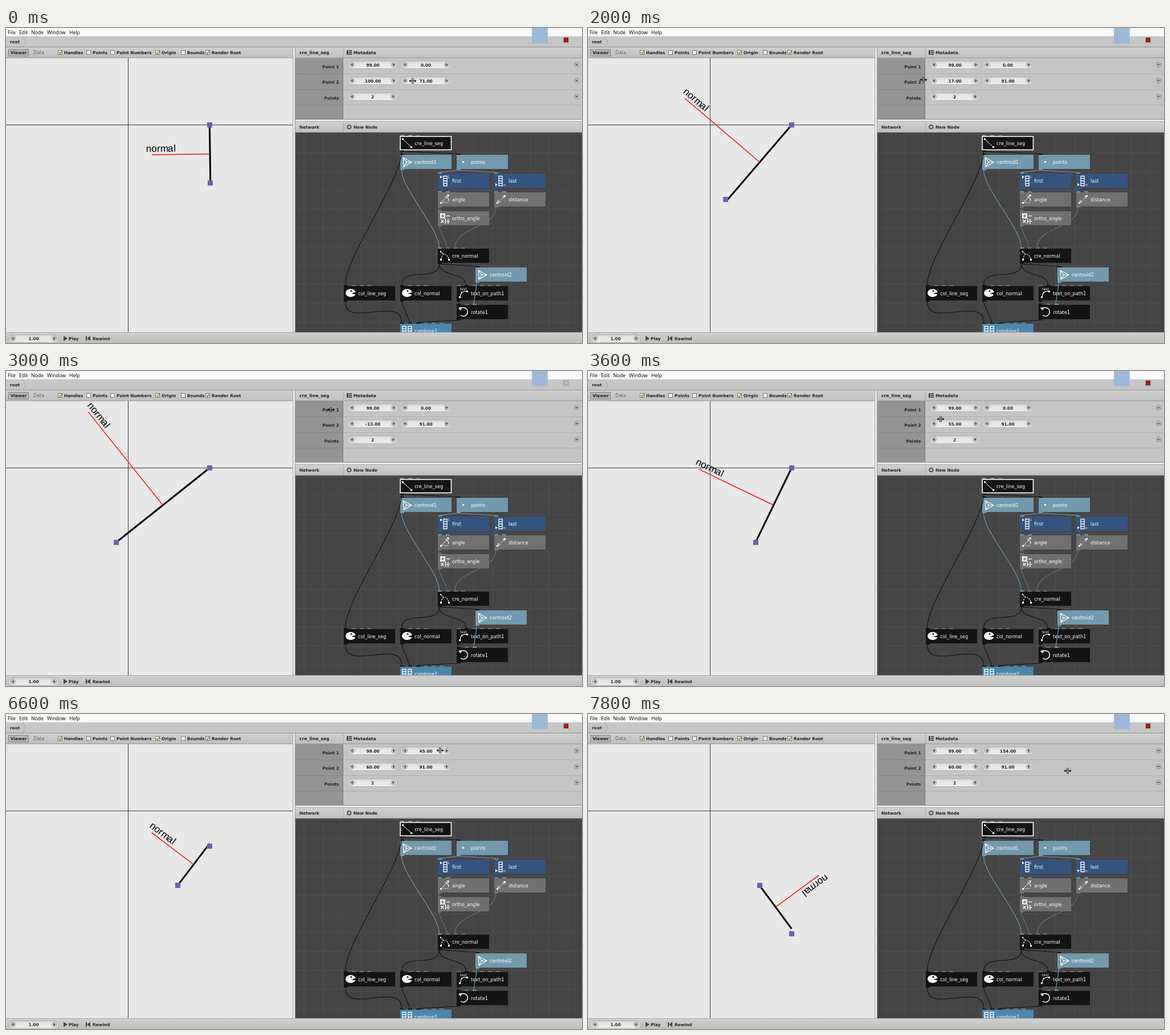
Write an HTML page that moves like this. It is 1011 px wide and 554 px high and loops after 8 s.

```html
<!DOCTYPE html>
<html lang="en">
<head>
<meta charset="utf-8">
<title>Line normal editor</title>
<style>
html, body { margin: 0; width: 100%; height: 100%; overflow: hidden; background: #c6c6c6; }
svg { display: block; width: 1011px; height: 554px; }
rect.c { shape-rendering: crispEdges; }
text { font-family: "DejaVu Sans", sans-serif; white-space: pre; }
.b { font-weight: bold; font-size: 7.35px; fill: #222; }
.menu { font-family: "Open Sans", sans-serif; font-size: 8.7px; fill: #000; }
.node { font-size: 8.2px; fill: #fff; }
.tiny { font-size: 6px; fill: #fff; }
.word { font-family: "Liberation Sans", sans-serif; font-size: 17.2px; fill: #000; }
</style>
</head>
<body>
<svg id="stage" viewBox="0 0 1011 554">
  <defs>
    <linearGradient id="bar" x2="0" y2="1"><stop stop-color="#d0d0d0"/><stop offset="1" stop-color="#bebebe"/></linearGradient>
    <linearGradient id="pill" x2="0" y2="1"><stop stop-color="#c9c9c9"/><stop offset=".35" stop-color="#e6e6e6"/><stop offset="1" stop-color="#ececec"/></linearGradient>
    <clipPath id="view"><rect x="0" y="53" width="503" height="482"/></clipPath>
    <clipPath id="net"><rect x="508" y="184" width="503" height="351"/></clipPath>
  </defs>
  <g id="panels"></g>
  <g id="network" clip-path="url(#net)"></g>
  <g clip-path="url(#view)">
    <path d="M0 170.5H503M214.5 53V535" stroke="#3a3a3a"/>
    <path id="segment" stroke="#000" stroke-width="3"/>
    <path id="normal" stroke="#f01010" stroke-width="1.5"/>
    <text id="word" class="word" dx="0 0 0 0.3 -1.3 0.8">normal</text>
    <rect id="h1" class="c" width="9" height="9" fill="#6a63ae"/>
    <rect id="h2" class="c" width="9" height="9" fill="#6a63ae"/>
  </g>
  <g id="busy"><rect class="c" x="979" y="17" width="8" height="8" fill="#4a2a2a"/><rect class="c" x="980" y="18" width="6" height="6" fill="#d01010"/></g>
  <g id="cursor">
    <path d="M-1.3-6V6M1.3-6V6" stroke="#fff" stroke-width="2.4" opacity=".5"/>
    <path d="M-1.2-5.5V5.5M1.2-5.5V5.5M-5.5 0H-1M1 0H5.5" stroke="#111" stroke-width="1.1"/>
    <path d="M-6.5 0l3-2.6v5.2zM6.5 0l-3-2.6v5.2z" fill="#111"/>
  </g>
</svg>
<script>
const $ = id => document.getElementById(id);
const rect = (x, y, w, h, fill, more = "") =>
  `<rect class="c" x="${x}" y="${y}" width="${w}" height="${h}" fill="${fill}" ${more}/>`;
const text = (x, y, s, cls = "b", more = "") => `<text class="${cls}" x="${x}" y="${y}" ${more}>${s}</text>`;
const line = (d, color, w = 1, dash = "none") =>
  `<path d="${d}" fill="none" stroke="${color}" stroke-width="${w}" stroke-dasharray="${dash}"/>`;
const fill = (d, color) => `<path d="${d}" fill="${color}"/>`;

function checkbox(x, label, on) {
  return `<rect x="${x + .5}" y="39.5" width="7" height="7" fill="#f2f2f2" stroke="#777"/>` +
    (on ? line(`M${x + 2} 43l1.8 2.2l3.4-5`, "#7f9a10", 1.6) : "") + text(x + 11, 46, label);
}

function numberField(x, y, w, value, id) {
  const knob = (cx, s) => `<circle cx="${cx}" cy="${y}" r="4.6" fill="#c4c4c4" stroke="#999" stroke-width=".7"/>` +
    fill(`M${cx + 2 * s} ${y}l${-3.6 * s}-2.6v5.2z`, "#444");
  return `<rect x="${x}" y="${y - 7}" width="${w}" height="14" rx="7" fill="url(#pill)" stroke="#aaa" stroke-width=".8"/>` +
    knob(x + 7, -1) + knob(x + w - 7, 1) +
    text(x + w / 2, y + 3, value, "b", `text-anchor="middle" ${id ? `id="${id}"` : ""}`);
}

// toolbar strip with a line under it
const strip = (x, y, w) => rect(x, y, w, 19, "url(#bar)") + rect(x, y + 18, w, 1, "#999");

function drawTop() {
  let s = rect(0, 0, 1011, 15, "#fafafa") + rect(0, 14, 1011, 1, "#e2e2e2") +
    rect(0, 15, 1011, 19, "#c6c6c6") + rect(0, 33, 1011, 1, "#8f8f8f");
  Object.entries({ File: 3, Edit: 23, Node: 44, Window: 72, Help: 111 })
    .forEach(([label, x]) => s += text(x, 10.5, label, "menu"));
  s += text(7, 27, "root") + line("M30 15.5l5.5 9l-5.5 9", "#8c8c8c") + line("M31 15.5l5.5 9l-5.5 9", "#e0e0e0", .8);
  s += rect(923, 0, 28, 27, "#9db9d8");
  return s + rect(978, 16, 10, 11, "#b0b0b0") + rect(979, 17, 8, 8, "#a5a5a5") + rect(980, 18, 6, 6, "#b9b9b9");
}

function drawViewer() {
  return strip(0, 34, 503) + rect(0, 53, 503, 482, "#e8e8e8") +
    rect(4.5, 37.5, 35, 12, "#b4b4b4", 'stroke="#888"') + text(8, 46, "Viewer") +
    text(48, 46, "Data", "b", 'style="fill:#59636b;font-weight:normal;font-size:8px"') +
    checkbox(91, "Handles", true) + checkbox(141, "Points") + checkbox(183, "Point Numbers") +
    checkbox(262, "Origin", true) + checkbox(307, "Bounds") + checkbox(350, "Render Root", true) +
    rect(503, 34, 5, 501, "#eaeaea") + rect(503, 34, 1, 501, "#aaa") + rect(507, 34, 1, 501, "#999");
}

function drawParams() {
  let s = strip(508, 34, 503) + text(515, 46, "cre_line_seg", "b", 'style="font-size:7.7px"') +
    rect(592, 35, 1, 17, "#aaa") + rect(598, 39, 3, 8, "#444");
  for (let i = 0; i < 3; i++) s += rect(602, 39 + 3 * i, 5, 2, "#444");
  s += text(610, 46, "Metadata") + rect(508, 53, 84, 108, "#949494") +
    rect(592, 53, 419, 108, "#c4c4c4") + rect(591, 53, 1, 108, "#777");
  ["Point 1", "Point 2", "Points"].forEach((label, i) => {
    const y = 64.5 + 28 * i, edge = Math.round(80 + 27.5 * i);
    s += rect(508, edge, 84, 1, "#858585") + rect(592, edge, 419, 1, "#adadad") +
      text(584.5, 71 + 27.3 * i, label, "b", 'text-anchor="end"') +
      `<circle cx="1001.5" cy="${y}" r="4" fill="#c9c9c9" stroke="#666" stroke-width=".8"/>` +
      fill(`M999 ${y - 1}h5l-2.5 3z`, "#444");
  });
  return s + numberField(600, 64.5, 88, "99.00") + numberField(693, 64.5, 88, "", "y1") +
    numberField(600, 92.5, 88, "", "x2") + numberField(693, 92.5, 88, "", "y2") + numberField(600, 120.5, 87, "2") +
    rect(508, 160, 503, 1, "#888") + rect(508, 161, 503, 4, "#eaeaea") + rect(508, 164, 503, 1, "#aaa");
}

function drawBars() {
  return strip(508, 165, 503) + rect(592, 166, 1, 17, "#aaa") + text(515, 177, "Network") +
    '<circle cx="602.3" cy="174" r="4.3" fill="#555"/>' + line("M599.8 174h5M602.3 171.5v5", "#ddd", 1.3) +
    text(610, 177, "New Node") +
    rect(0, 535, 1011, 19, "url(#bar)") + rect(0, 535, 1011, 1, "#aaa") + numberField(5, 546, 87, "1.00") +
    fill("M101 541.5l7 4.5l-7 4.5z", "#444") + text(110, 549, "Play") +
    rect(140, 542, 1.5, 8, "#444") + fill("M148 541.5v9l-6-4.5z", "#444") + text(152, 549, "Rewind");
}

const BLACK = "#141414", SKY = "#7399ae", NAVY = "#34547f", GRAY = "#707070", BLUE = "#4a87ae", W = "#fff";
const dot = (x, y, r = 3) => rect(x, y, r, r, W);
const ladder = x => line(`M${x} 4.5h6v17h-6zM${x} 8.7h6M${x} 13h6M${x} 17.3h6`, W, 1.3);

// icons are drawn relative to the node corner
const icons = {};
icons.seg = line("M5 6L19 19", W) + dot(3, 4) + dot(18, 18);
icons.centroid = line("M11 13L5 5L20 13L6 21L5 5M20 13H11L6 21", W, 1.1) + dot(10, 12, 2);
icons.points = dot(10, 11);
icons.first = ladder(10) + fill("M4 3.5l4 2.5l-4 2.5z", W) + text(17, 8, "1", "tiny");
icons.last = ladder(8) + fill("M2 17l4 2.5l-4 2.5z", W) + text(16, 22, "n", "tiny");
icons.angle = line("M6 18L18 6", W, .9) + line("M6 18H20", W, 1, "2 1.5") +
  line("M13 7Q19 9 19 15", W, 1.2) + dot(4, 17) + fill("M15 4h5l-1 4z", W);
icons.distance = line("M6 18L18 7", W, 1, "2 1.5") + dot(4, 17) + dot(17, 5) + line("M7 13v4h4M14 7h3v4", W, .9);
icons.ortho = rect(4, 4, 9, 9, W) + line("M8.5 5.5v6M5.5 8.5h6", GRAY, 1.5) +
  line("M15 8.5h6M15 18h6M5.5 15.5l5 5M10.5 15.5l-5 5M13.5 13v9", W, 1.4) + dot(17, 14, 2) + dot(17, 20, 2);
icons.normal = line("M6 19Q7 9 12 10T20 20", W, 1.2, "2.5 1.6") + dot(4, 18) + dot(18, 18) + line("M5 6l6 4", W) + dot(4, 4, 2);
icons.color = '<ellipse cx="12" cy="12" rx="9" ry="7" fill="#fff"/>' + fill("M13 13l10-3v5z", BLACK) +
  '<circle cx="13" cy="8.5" r="1.5" fill="#141414"/>';
icons.path = line("M6 19Q7 8 18 9", W, 1.3) + dot(4, 18) + dot(17, 8) + dot(8, 10, 2) + text(6, 7, "text", "tiny");
icons.rotate = line("M6 7.5A7.5 7.5 0 1 1 7 18", W, 1.5) + fill("M3 5l6-1l-2 6z", W);
icons.combine = ladder(4) + ladder(14);

// name, grid column, grid row, color, icon, input port colors
const nodes = [
  ["cre_line_seg", 3, 0, BLACK, "seg", [SKY, SKY, GRAY]],
  ["centroid1", 3, 1, SKY, "centroid", [BLACK]],
  ["points", 6, 1, SKY, "points", [BLACK]],
  ["first", 5, 2, NAVY, "first", [SKY]],
  ["last", 8, 2, NAVY, "last", [SKY]],
  ["angle", 5, 3, GRAY, "angle", [SKY, SKY]],
  ["distance", 8, 3, GRAY, "distance", [SKY, SKY]],
  ["ortho_angle", 5, 4, GRAY, "ortho", [GRAY]],
  ["cre_normal", 5, 6, BLACK, "normal", [SKY, GRAY, GRAY, GRAY]],
  ["centroid2", 7, 7, SKY, "centroid", [BLACK]],
  ["col_line_seg", 0, 8, BLACK, "color", [BLACK, GRAY, GRAY, GRAY]],
  ["col_normal", 3, 8, BLACK, "color", [BLACK, GRAY, GRAY, GRAY]],
  ["text_on_path1", 6, 8, BLACK, "path", [GRAY, BLACK, GRAY, GRAY, GRAY, GRAY]],
  ["rotate1", 6, 9, BLACK, "rotate", [BLACK, GRAY, SKY]],
  ["combine1", 3, 10, BLUE, "combine", [BLACK, BLACK, BLACK, GRAY, GRAY, GRAY]]
].map(([name, col, row, color, icon, ports]) =>
  ({ name, color, icon, ports, x: 593 + 33 * col, y: 190 + 33 * row }));

// from > to, with the input port when it is not the first
const links = `cre_line_seg>centroid1 cre_line_seg>points cre_line_seg>col_line_seg centroid1>cre_normal
  points>first points>last first>angle first>distance last>angle:1 last>distance:1 angle>ortho_angle
  ortho_angle>cre_normal:1 distance>cre_normal:2 cre_normal>centroid2 cre_normal>col_normal
  cre_normal>text_on_path1:1 centroid2>rotate1:2 text_on_path1>rotate1 rotate1>combine1:2
  col_normal>combine1:1 col_line_seg>combine1`.split(/\s+/);

function drawLink(link) {
  const [from, to, port = 0] = link.split(/[>:]/);
  const a = nodes.find(n => n.name === from), b = nodes.find(n => n.name === to);
  const x0 = a.x + 2.5, y0 = a.y + 27, x1 = b.x + 2.5 + 13.8 * port, y1 = b.y - 2;
  const bend = Math.abs(x1 - x0) / 2;
  return line(y1 - y0 < 33 ? `M${x0} ${y0}L${x1} ${y1}`
    : `M${x0} ${y0}C${x0} ${y0 + bend} ${x1} ${y1 - bend} ${x1} ${y1}`, a.color, 1.2);
}

function drawNode({ name, x, y, color, icon, ports }, i) {
  const inputs = ports.map((c, k) => rect(Math.round(x + 13.8 * k), y - 2, 7, 2, c)).join("");
  const frame = i ? "" : `<rect x="${x}" y="${y + .7}" width="89.5" height="23.6" fill="none" stroke="#fff" stroke-width="1.6"/>`;
  return inputs + rect(x, y + 25, 7, 2, color) + rect(x, y, 90, 25, color) + frame +
    `<g transform="translate(${x} ${y})">${icons[icon]}</g>` + text(x + 25, y + 15.7, name, "node");
}

function drawNetwork() {
  let s = rect(508, 184, 503, 351, "#444");
  for (let i = 0; i < 16; i++)
    s += rect(Math.round(522.5 + 33.1 * i), 184, 1, 351, "#4e4e4e") +
      rect(508, Math.round(186 + 33.05 * i), 503, 1, "#4e4e4e");
  return s + nodes.map(drawNode).join("") + links.map(drawLink).join("");
}

// each track: time, then values
const pointer = [
  [0, 714, 93], [540, 727, 93], [800, 727, 93], [1000, 648, 93], [2000, 589, 91], [2700, 569, 76],
  [3000, 570, 68], [3200, 572, 70], [3520, 613, 83], [3600, 619, 84.5], [4200, 640, 84], [4400, 739, 73],
  [5000, 673, 64.5], [5200, 656, 63], [5400, 656, 63], [5800, 719, 63], [6000, 719, 63],
  [6600, 762, 64], [7140, 782, 68], [7200, 782, 68], [7800, 842, 100]
];

function at(track, t) {
  const i = track.findIndex(k => k[0] >= t);
  if (i <= 0) return track[i ? track.length - 1 : 0].slice(1);
  const a = track[i - 1], b = track[i], p = (t - a[0]) / (b[0] - a[0]);
  return a.slice(1).map((v, k) => v + (b[k + 1] - v) * p);
}

const trackX2 = [[800, 100], [1000, 97], [1800, 31], [2000, 17], [2700, -15], [2990, -15], [3000, -13],
  [3200, -13], [3400, 17], [3520, 55], [3600, 55], [3900, 60]];
const trackY1 = [[6000, 0], [6200, 11], [6600, 45], [7140, 73], [7200, 73], [7400, 92], [7600, 120], [7800, 154]];
const trackY2 = [[0, 71], [540, 91]];
const points = t => ({ y1: at(trackY1, t)[0], x2: at(trackX2, t)[0], y2: at(trackY2, t)[0] });

const busySpans = [[0, 600], [1000, 3000], [3400, 4200], [6200, 7200], [7400, 8000]];
const LOOP = 8000, STEP = 200, LINE_LAG = 60, HANDLE_LAG = 22, ZOOM = 1.44;
const toX = v => 214.8 + v * ZOOM, toY = v => 170.5 + v * ZOOM;

function placeHandle(id, x, y) {
  $(id).setAttribute("x", Math.floor(toX(x)) - 4);
  $(id).setAttribute("y", Math.floor(toY(y)) - 4);
}

function drawSegment({ y1, x2, y2 }) {
  const ax = toX(99), ay = toY(y1), bx = toX(x2), by = toY(y2);
  const dx = ax - bx, dy = ay - by;
  const mx = (ax + bx) / 2, my = (ay + by) / 2, ex = mx + dy, ey = my - dx;
  const angle = Math.atan2(dx, -dy) * 180 / Math.PI;
  $("segment").setAttribute("d", `M${ax} ${ay}L${bx} ${by}`);
  $("normal").setAttribute("d", `M${mx} ${my}L${ex} ${ey}`);
  $("word").setAttribute("transform", `translate(${ex} ${ey}) rotate(${angle}) translate(-10 -5.2)`);
}

function render(t) {
  $("cursor").setAttribute("transform", `translate(${at(pointer, t)})`);
  Object.entries(points(t)).forEach(([id, v]) => $(id).textContent = Math.round(v).toFixed(2));

  const late = points(t - HANDLE_LAG);
  placeHandle("h1", 99, late.y1);
  placeHandle("h2", late.x2, late.y2);
  drawSegment(points(t - LINE_LAG));
  $("busy").style.display = busySpans.some(([a, b]) => t >= a && t < b) ? "" : "none";
}

$("panels").innerHTML = drawTop() + drawViewer() + drawParams() + drawBars();
$("network").innerHTML = drawNetwork();
const start = performance.now();
function tick() {
  const t = (performance.now() - start) % LOOP;
  render(Math.floor(t / STEP) * STEP);
  requestAnimationFrame(tick);
}
tick();
</script>
</body>
</html>
```
